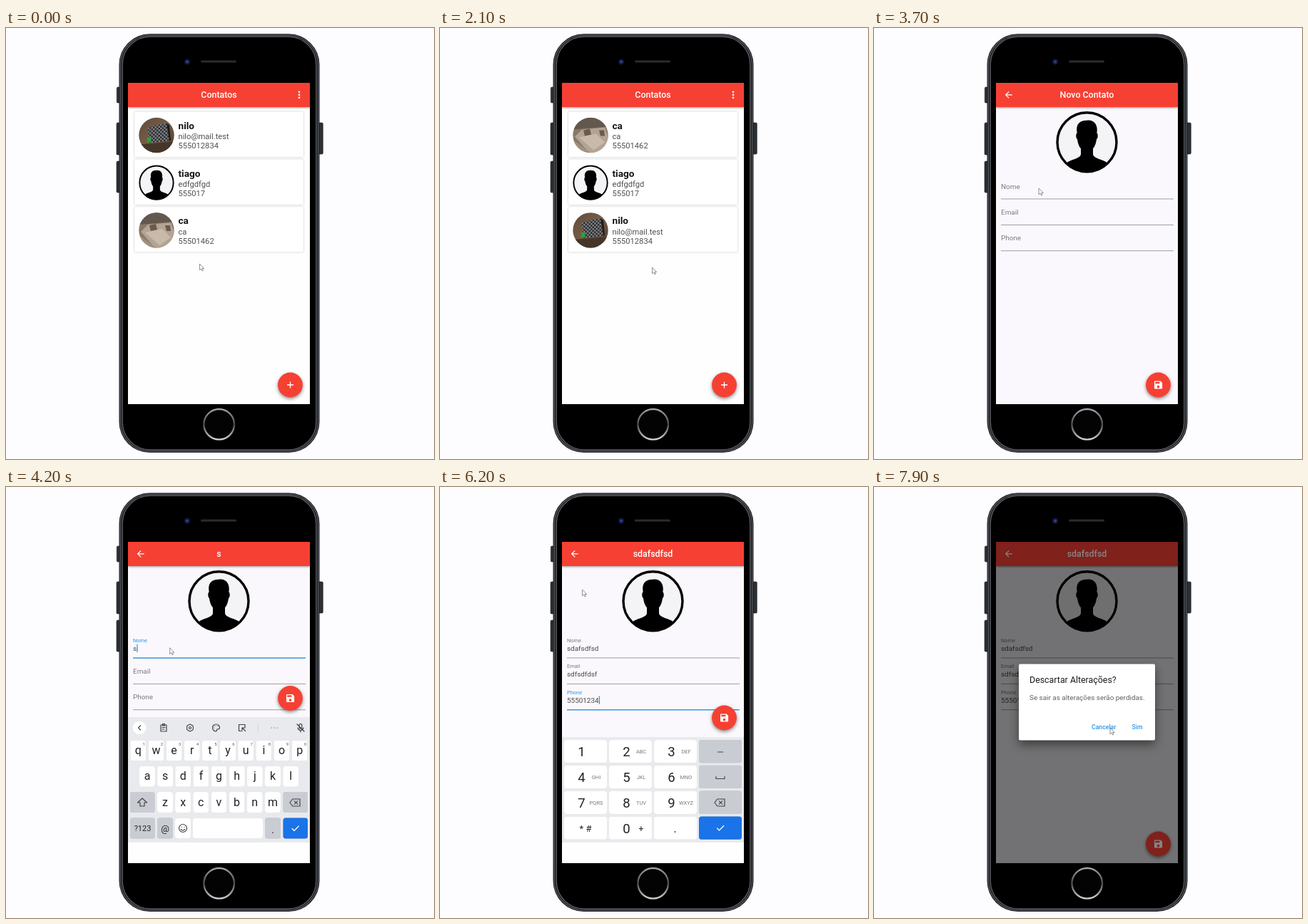
An HTML page that plays this animation: 600x605 px, repeating every 8 s.

```html
<!DOCTYPE html>
<html lang="pt">
<head>
<meta charset="utf-8">
<title>Contatos</title>
<style>
html, body { margin: 0; width: 100%; height: 100%; overflow: hidden; background: #fdfcfe; }
svg { display: block; width: 100%; height: 100%; }
text { font-family: Roboto, "Noto Sans", sans-serif; white-space: pre; }
.title { font-size: 12.4px; font-weight: 500; fill: #fff; text-anchor: middle; }
.bar { fill: #f64033; filter: drop-shadow(0 1px 1.5px #0006); }
.fab circle { fill: #f64033; filter: drop-shadow(0 2px 2.5px #0007); }
.card rect { fill: #fff; filter: drop-shadow(0 .7px .8px #0004); }
.name { font-size: 13.64px; font-weight: 700; fill: #161616; }
.info { font-size: 11.16px; fill: #505050; }
.value { font-size: 9.92px; fill: #484848; }
.key { fill: #fff; filter: drop-shadow(0 .8px .2px #0003); }
.key.grey { fill: #c9ccd2; }
.key.blue { fill: #1a73e8; }
.mid { text-anchor: middle; fill: #222; }
.line { fill: none; stroke: #444; stroke-width: 1.2; stroke-linecap: round; stroke-linejoin: round; }
.white { stroke: #fff; }
.popup { fill: #fff; filter: drop-shadow(0 6px 7px #0007); }
.action { font-size: 8.68px; font-weight: 500; fill: #2f95e8; }
</style>
</head>
<body>
<svg viewBox="0 0 600 605">
  <defs>
    <clipPath id="screen"><rect x="171" y="77" width="255" height="451"/></clipPath>
    <clipPath id="face"><circle r="41"/></clipPath>
    <clipPath id="photo"><circle r="24.7"/></clipPath>
    <linearGradient id="ring" x2="0" y2="1">
      <stop offset="0" stop-color="#a2a4a6"/><stop offset=".5" stop-color="#48494c"/>
      <stop offset="1" stop-color="#d2d3d4"/>
    </linearGradient>
    <linearGradient id="wood" x2="1" y2="1">
      <stop offset="0" stop-color="#5f4a38"/><stop offset=".5" stop-color="#775e48"/>
      <stop offset="1" stop-color="#49382b"/>
    </linearGradient>
    <pattern id="checks" width="5" height="5" patternUnits="userSpaceOnUse" patternTransform="skewY(-7)">
      <rect width="5" height="5" fill="#25262a"/>
      <path d="M0 0h2.5v2.5H0zM2.5 2.5H5V5H2.5z" fill="#85858a"/>
    </pattern>
    <g id="person">
      <circle r="41.5" fill="#f4f3f6" stroke="#000" stroke-width="3.4"/>
      <path clip-path="url(#face)" d="M-36 45C-34 32-29 28-22 25.5C-15 23-9 21-8.5 17V9C-12 5-13-1-13.5-4C-16-6-15.5-12-13.8-13C-16-24-11-31 0-30.500C10-32 16-24 13.8-13C15.500-12 16-6 13.500-4C13-1 12 5 8.500 9V17C9 21 15 23 22 25.500C29 28 34 32 36 45Z"/>
    </g>
    <g id="board" clip-path="url(#photo)">
      <rect x="-25" y="-25" width="50" height="50" fill="url(#wood)"/>
      <path d="M-25 13L25 9V25H-25Z" fill="#463629"/>
      <path d="M-12-11L14-17L18 8L-10 11Z" fill="url(#checks)"/>
      <path d="M14-17L18-14L20 7L18 8Z" fill="#1c1c1e"/>
      <path d="M-13 3h5v7h-5z" fill="#25a636"/>
    </g>
    <g id="sofa" clip-path="url(#photo)">
      <rect x="-25" y="-25" width="50" height="50" fill="#8a7867"/>
      <path d="M-25-25H25V-12L-25-8Z" fill="#63584e"/>
      <path d="M-22 2L-12-8L20-11L25 3V25H-2Z" fill="#b3a392"/>
      <path d="M-16 3L8-2L20 10L4 21Z" fill="#c8baaa"/>
      <path d="M-10-7l9-2 2 8-9 2zM12-7l7 0 1 8-6 0z" fill="#685a4e"/>
      <path d="M-25 6L0 25H-25Z" fill="#a0917f"/>
    </g>
    <path id="del" class="line" d="M-7 0L-3.2-5H7V5H-3.2ZM-.7-2.2L3.7 2.2M3.7-2.2L-.7 2.2"/>
    <path id="tick" class="line white" d="M-4.5 .5L-1.5 3.5L4.8-3"/>
  </defs>

  <!-- phone -->
  <g fill="#2d2f32" stroke="#17181a" stroke-width=".6">
    <rect x="155.3" y="83" width="6" height="22" rx="1.5"/>
    <rect x="155" y="133" width="6" height="45" rx="1.5"/>
    <rect x="155" y="187" width="6" height="44" rx="1.5"/>
    <rect x="438" y="133" width="6.3" height="44" rx="1.5"/>
  </g>
  <rect x="158.5" y="8.3" width="281" height="587.7" rx="43" fill="#1a1b1e"/>
  <rect x="160.3" y="10" width="277.4" height="584.3" rx="41.5" fill="none" stroke="#4d5056" stroke-width="1.6"/>
  <rect x="163.2" y="12.2" width="271.6" height="579.9" rx="39" fill="#000" stroke="#63666b" stroke-width="1.2"/>
  <circle cx="254" cy="47.5" r="4" fill="#11163a"/><circle cx="254" cy="47.5" r="2" fill="#2d3f92"/>
  <rect x="273" y="45.5" width="50" height="3" rx="1.5" fill="#2b2b2d"/>
  <circle cx="298.7" cy="556.3" r="21.3" fill="#030303" stroke="url(#ring)" stroke-width="2.4"/>

  <g clip-path="url(#screen)">
    <rect x="171" y="77" width="255" height="451" fill="#fefefe"/>
    <g id="cards"></g>
    <rect class="bar" x="171" y="77" width="255" height="34"/>
    <text class="title" x="298.5" y="98.3">Contatos</text>
    <g fill="#fff"><circle cx="411" cy="89.8" r="1.35"/><circle cx="411" cy="93.8" r="1.35"/><circle cx="411" cy="97.8" r="1.35"/></g>
    <g class="fab" transform="translate(398.5 501)"><circle r="17.4"/><path d="M-4.5 0H4.5M0-4.5V4.5" stroke="#fff" stroke-width="1.3"/></g>

    <g id="form">
      <rect x="171" y="77" width="255" height="451" fill="#faf8fc"/>
      <use href="#person" x="298.5" y="160.3"/>
      <g id="fields"></g>
      <rect id="dim" x="171" y="77" width="255" height="451"/>
      <g id="head">
        <rect class="bar" x="171" y="77" width="255" height="34"/>
        <path d="M20 11H7.83l5.59-5.59L12 4l-8 8 8 8 1.41-1.41L7.83 13H20z" fill="#fff" transform="translate(181.3 86.4) scale(.62)"/>
        <text id="title" class="title" x="298.5" y="98.3"></text>
        <circle id="ripple" cx="189" cy="94" r="20" fill="#fff"/>
      </g>
      <g id="save" class="fab"><circle r="17.4"/>
        <path d="M17 3H5c-1.1 0-2 .9-2 2v14c0 1.1.9 2 2 2h14c1.1 0 2-.9 2-2V7zm-5 16a3 3 0 1 1 0-6 3 3 0 0 1 0 6zm3-10H5V5h10z" fill="#fff" transform="translate(-7.4 -7.4) scale(.62)"/></g>
    </g>

    <g id="dialog">
      <rect class="popup" x="203" y="0" width="191" height="107" rx="2"/>
      <text x="218" y="26.3" font-size="12.4" fill="#1c1c1c">Descartar Alterações?</text>
      <text x="218" y="50.7" font-size="9.92" fill="#606060">Se sair as alterações serão perdidas.</text>
      <text class="action" x="305" y="91">Cancelar</text>
      <text class="action" x="361.5" y="91">Sim</text>
    </g>
    <g id="letters"></g>
    <g id="digits"></g>
  </g>
  <path id="cursor" d="M0 0V8.8L2 7L3.5 10L4.9 9.3L3.5 6.5H6.2Z" fill="#fff" stroke="#777" stroke-width=".8"/>
</svg>
<script>
const $ = id => document.getElementById(id);
const LOOP = 8000;

// Contact list
const people = [
  ["nilo", "nilo@mail.test", "555012834", '<use href="#board"/>'],
  ["tiago", "edfgdfgd", "555017", '<use href="#person" transform="scale(.57)"/>'],
  ["ca", "ca", "55501462", '<use href="#sofa"/>']
];
$("cards").innerHTML = people.map(([name, mail, phone, art]) => `<g class="card">
  <rect x="180" y="0" width="237" height="63.5" rx="1.5"/>
  <g transform="translate(211 33)">${art}</g>
  <text class="name" x="241.5" y="24.5">${name}</text>
  <text class="info" x="241.5" y="38.8">${mail}</text>
  <text class="info" x="241.5" y="51.8">${phone}</text></g>`).join("");
const cards = [...$("cards").children];

// Form: label, typed text, focus time, first key time, key interval
const fields = [
  ["Nome", "sdafsdfsd", 3950, 4160, 52],
  ["Email", "sdfsdfdsf", 4690, 4810, 60],
  ["Phone", "55501234", 5450, 5690, 55]
];
const BLUR = 6650;
$("fields").innerHTML = fields.map(([label], i) => `<g transform="translate(178 ${203.5 + i * 36.4})">
  <text>${label}</text><text class="value" y="26.5"></text>
  <rect width="242"/><rect y="17" width="1.2" height="11.5" fill="#2196f3"/></g>`).join("");
const rows = [...$("fields").children].map(g => [...g.children]);

// Keyboards
const key = (x, y, w, h, type = "") => `<rect class="key ${type}" x="${x}" y="${y}" width="${w}" height="${h}" rx="3.5"/>`;
const label = (s, x, y, size, fill = "#222") => `<text class="mid" x="${x}" y="${y}" font-size="${size}" style="fill:${fill}">${s}</text>`;
const icon = (d, x, y) => `<path class="line" d="${d}" transform="translate(${x} ${y})"/>`;
const use = (id, x, y) => `<use href="#${id}" x="${x}" y="${y}"/>`;
const base = top => `<rect x="171" y="${top}" width="255" height="${499 - top}" fill="#e8eaed"/>
  <rect x="171" y="499" width="255" height="240" fill="#fefefe"/>`;

function letterPad() {
  let s = base(323) + '<circle cx="187" cy="338" r="9.3" fill="#fff"/>' +
    icon("M1.5-3L-1.5 0L1.5 3", 187, 338) +
    icon("M-4-4H4V5H-4ZM-1.5-5.5H1.5V-3H-1.5ZM-2-.5H2M-2 2H1", 221, 338) +
    icon("M-2-4L0-5L2-4L4-3L4.5 0L4 3L2 4L0 5L-2 4L-4 3L-4.5 0L-4-3ZM-1.5 0A1.5 1.5 0 1 0 1.5 0A1.5 1.5 0 1 0-1.5 0", 258, 338) +
    icon("M0 5A5 5 0 1 1 5 0C5 3 1 1 1 3Q1 5 0 5M-3 0h.1M-1.5-2.5h.1M1.5-2.5h.1", 294.5, 338) +
    icon("M4 0V-4.5H-4.5V4.5H0M0 0L4.5 4.5M0 3V0H3", 331, 338) +
    '<path d="M353.5 332V344" stroke="#d2d4d8"/>' +
    icon("M-4 0h.1M0 0h.1M4 0h.1", 376, 338) +
    icon("M-1.8-4.5Q0-6.5 1.8-4.5V0Q0 2-1.8 0ZM-4 0Q-3 3.5 0 3.5T4 0M0 3.5V6M-5-5L5 5", 413, 338);
  [["qwertyuiop", 185.3, 355.5], ["asdfghjkl", 198, 391.7], ["zxcvbnm", 223, 428]].forEach(([chars, x0, y], r) =>
    [...chars].forEach((c, i) => {
      const x = x0 + i * 25.15;
      s += key(x - 11, y, 22, 29) + label(c, x, y + 19.5, 16);
      if (!r) s += label((i + 1) % 10, x + 8, y + 7, 6, "#555");
    }));
  return s + key(174, 428, 34.5, 29, "grey") + icon("M0-6L6.5 0H3V5H-3V0H-6.5Z", 191, 443) +
    key(388.5, 428, 34.5, 29, "grey") + use("del", 405, 443) +
    key(174, 464.5, 35, 29, "grey") + label("?123", 191.5, 483, 11) +
    key(212, 464.5, 22, 29, "grey") + label("@", 223, 484, 13) +
    key(237, 464.5, 22, 29) + icon("M-5.5 0A5.5 5.5 0 1 0 5.5 0A5.5 5.5 0 1 0-5.5 0M-2-1.7h.1M2-1.7h.1M-2.7 1.5Q0 4.5 2.7 1.5", 248, 479) +
    key(262, 464.5, 98, 29) +
    key(363, 464.5, 22, 29, "grey") + label(".", 374, 486, 15) +
    key(388.5, 464.5, 34.5, 29, "blue") + use("tick", 405.5, 479);
}

function numberPad() {
  const groups = ["", "ABC", "DEF", "GHI", "JKL", "MNO", "PQRS", "TUV", "WXYZ"];
  let s = base(351);
  for (let r = 0; r < 4; r++)
    for (let c = 0; c < 4; c++)
      s += key(174 + c * 63, 355 + r * 35.8, 60, 32.3, c < 3 ? "" : r < 3 ? "grey" : "blue");
  groups.forEach((g, i) => {
    const x = 198.5 + i % 3 * 63, y = 378.3 + (i / 3 | 0) * 35.8;
    s += label(i + 1, x, y, 18.5) + label(g, x + 20.5, y - 4, 7.4, "#777");
  });
  return s + label("* #", 204, 484, 13) + label("0", 261.5, 486, 18.5) + label("+", 282, 484, 12) + label(".", 329.5, 485, 17) +
    icon("M-3.5 0H3.5", 393, 372) + icon("M-6-1.5V1.5H6V-1.5", 393, 408) +
    use("del", 392, 443) + use("tick", 393, 478.5);
}
$("letters").innerHTML = letterPad();
$("digits").innerHTML = numberPad();

// Value of a track [time, value] at time t, eased between points
function at(t, track) {
  const i = track.findIndex(p => p[0] > t);
  if (i < 0) return track[track.length - 1][1];
  if (!i) return track[0][1];
  const [t0, a] = track[i - 1], [t1, b] = track[i];
  const k = (t - t0) / (t1 - t0);
  return a + (b - a) * k * k * (3 - 2 * k);
}
const path = [
  [0, 271.5, 331], [100, 271.5, 331], [650, 409, 92], [850, 409, 92], [1150, 350, 138], [1350, 350, 138],
  [2100, 297.5, 336], [2500, 397, 499], [2900, 397, 499], [3700, 231, 225], [4500, 229, 226],
  [4680, 217, 262], [5000, 219, 282], [5400, 214, 298], [5800, 214, 298], [6200, 199.5, 144],
  [6500, 188.5, 92], [6850, 188.5, 92], [7450, 302, 322], [7900, 331, 338]
];
const pathX = path.map(p => [p[0], p[1]]), pathY = path.map(p => [p[0], p[2]]);
const move = (id, x, y) => $(id).setAttribute("transform", `translate(${x} ${y})`);
const show = (id, on) => $(id).style.display = on ? "" : "none";

function drawField([label, text, start, first, gap], i, t) {
  const [tag, value, line, caret] = rows[i];
  const typed = text.slice(0, Math.max(0, Math.floor((t - first) / gap) + 1));
  const end = i < 2 ? fields[i + 1][2] : BLUR;
  const focus = t >= start && t < end;
  const up = typed ? 1 : at(t, [[start, 0], [start + 150, 1]]);
  value.textContent = typed;
  tag.setAttribute("y", 22 - up * 7.5);
  tag.setAttribute("font-size", 9.92 - up * 2.48);
  tag.setAttribute("fill", focus ? "#2f95e8" : "#7c7a7e");
  line.setAttribute("y", focus ? 35.8 : 36);
  line.setAttribute("height", focus ? 1.4 : .9);
  line.setAttribute("fill", focus ? "#2f8de0" : "#959397");
  caret.style.display = focus ? "" : "none";
  caret.setAttribute("x", typed ? value.getComputedTextLength() + .3 : 0);
  return typed;
}

function draw(t) {
  const reversed = t >= 1350;
  cards.forEach((c, i) => c.setAttribute("transform", `translate(0 ${117.5 + 66.7 * (reversed ? 2 - i : i)})`));

  const open = at(t, [[2650, 0], [2900, 1]]);
  show("form", open > 0);
  $("form").style.opacity = open;
  move("form", 0, 40 * (1 - open));
  const typed = fields.map((f, i) => drawField(f, i, t));
  $("title").textContent = typed[0] || "Novo Contato";

  show("letters", t > 3980 && t < 5560);
  show("digits", t >= 5560 && t < 6860);
  move("letters", 0, at(t, [[3980, 205], [4160, 0]]));
  move("digits", 0, at(t, [[6680, 0], [6800, 151], [6860, 177]]));
  move("save", 398.5, at(t, [[4020, 501], [4200, 296.5], [5560, 296.5], [5640, 324], [6690, 324], [6800, 426.5], [6900, 501]]));

  const shade = at(t, [[6620, 0], [6780, 1]]);
  $("dim").style.opacity = shade * .54;
  for (const id of ["head", "save"]) $(id).style.filter = shade ? `brightness(${1 - shade * .48})` : "";
  $("ripple").style.opacity = at(t, [[6560, 0], [6640, .2], [6800, .13], [6950, 0]]);
  show("dialog", shade > 0);
  $("dialog").style.opacity = shade;
  move("dialog", 0, at(t, [[6800, 163], [6950, 248.6]]));
  move("cursor", at(t, pathX), at(t, pathY));
}

let began;
function tick(now) {
  began ??= now;
  draw((now - began) % LOOP);
  requestAnimationFrame(tick);
}
draw(0);
requestAnimationFrame(tick);
</script>
</body>
</html>
```
